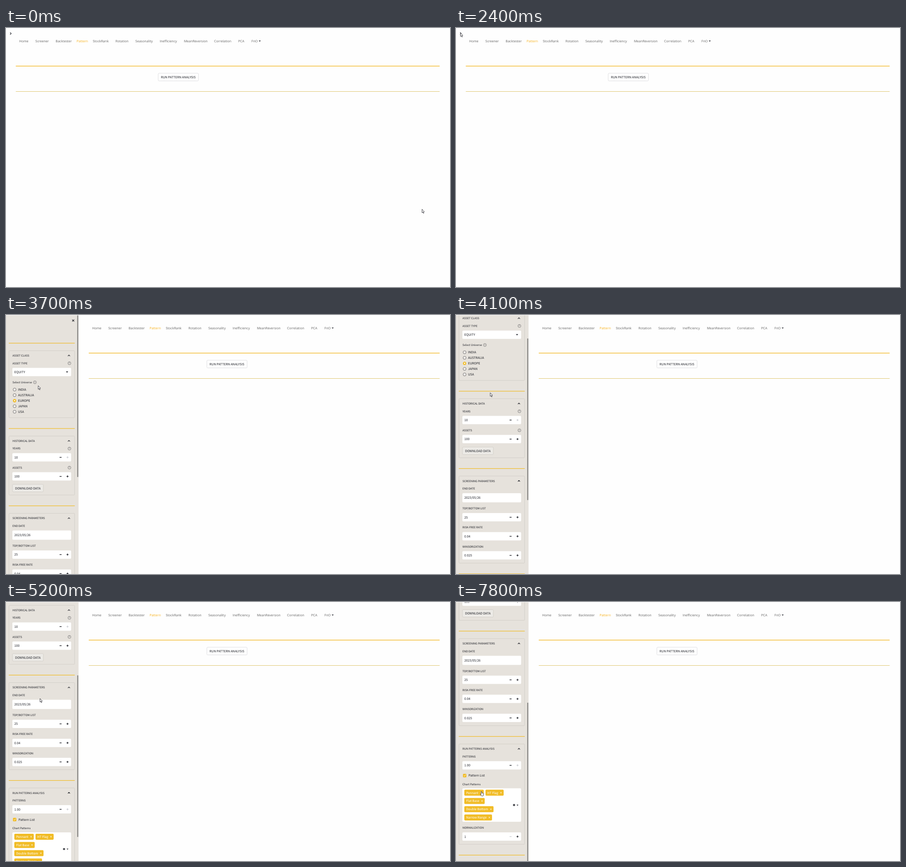
An HTML page with a canvas for the animation above (8 s loop, 960 by 561 pixels).

```html
<!DOCTYPE html>
<html lang="en">
<head>
<meta charset="utf-8">
<title>Pattern analysis dashboard</title>
<style>
html, body { margin: 0; width: 960px; height: 561px; overflow: hidden; background: #fefefe; }
canvas { display: block; width: 960px; height: 561px; }
</style>
</head>
<body>
<canvas id="stage"></canvas>
<script>
const W = 960, H = 561, LOOP = 8000, STEP = 100;
const canvas = document.getElementById('stage');
const ctx = canvas.getContext('2d');
const dpr = window.devicePixelRatio || 1;
canvas.width = W * dpr;
canvas.height = H * dpr;

const UI = '"Noto Sans CJK JP", "Noto Sans CJK SC", "Noto Sans CJK", "Open Sans", sans-serif';
const NAV = '"Open Sans", "Noto Sans", sans-serif';
const LABEL = 5.88, BODY = 6.73, MENU = 7.1;
const INK = '#1b1d24', GOLD = '#f1bc26', EDGE = '#cfcbc5', PANE = '#e6e2dc';
const OPEN_AT = 2800, SETTLE_AT = 3100, HAND_AT = 7000;
const ROW = 41.25, LEFT = 13.8, RIGHT = 140.8;

const menu = [
  ['Home', 28.5], ['Screener', 63.5], ['Backtester', 107.3], ['Pattern', 152.7],
  ['StockRank', 187.7], ['Rotation', 236.8], ['Seasonality', 279.8], ['Inefficiency', 332.2],
  ['MeanReversion', 384.7], ['Correlation', 450], ['PCA', 502], ['FnO', 530.8]
];

// Each move: start, duration, then the place it eases to.
const pointer = { from: [899.5, 392.5], moves: [
  [0, 400, 889, 379.5], [1200, 100, 647.5, 240.5], [1300, 800, 36, 20], [2100, 400, 8, 10],
  [2700, 200, 34.5, 30.5], [2900, 1200, 74, 168.5], [4100, 1100, 73.5, 209],
  [5200, 600, 73.5, 213.5], [6300, 800, 71, 464], [7100, 700, 55, 410.3]
] };
const scroll = { from: [0], moves: [
  [3700, 400, 80.8], [4100, 1100, 255], [5400, 400, 348], [5800, 300, 350.3]
] };
const slide = { from: [-157], moves: [[2700, 375, 0]] };

function place({ from, moves }, t) {
  let now = from;
  for (const [start, span, ...to] of moves) {
    const k = Math.min(1, Math.max(0, (t - start) / span));
    const e = 1 - (1 - k) ** 2;
    now = now.map((v, i) => v + (to[i] - v) * e);
  }
  return now;
}

function text(str, x, y, size = BODY, color = INK, family = UI) {
  ctx.font = `${size}px ${family}`;
  ctx.fillStyle = color;
  ctx.fillText(str, x, y + size * 0.365);
  return ctx.measureText(str).width;
}

function box(x, y, w, h, fill, stroke, r = 2) {
  ctx.beginPath();
  ctx.roundRect(x, y, w, h, r);
  if (fill) { ctx.fillStyle = fill; ctx.fill(); }
  if (stroke) { ctx.strokeStyle = stroke; ctx.lineWidth = 0.8; ctx.stroke(); }
}

function trace(points) {
  ctx.beginPath();
  points.forEach(([x, y], i) => i ? ctx.lineTo(x, y) : ctx.moveTo(x, y));
}

function path(points, color, width) {
  trace(points);
  ctx.strokeStyle = color;
  ctx.lineWidth = width;
  ctx.stroke();
}

function rule(x1, x2, y, h, color = GOLD) {
  ctx.fillStyle = color;
  ctx.fillRect(x1, y - h / 2, x2 - x1, h);
}

function cross(x, y, r, color, width) {
  path([[x - r, y - r], [x + r, y + r]], color, width);
  path([[x + r, y - r], [x - r, y + r]], color, width);
}

function caret(x, y, r) {
  trace([[x - r, y - r / 2], [x + r, y - r / 2], [x, y + r * 0.6]]);
  ctx.fillStyle = INK;
  ctx.fill();
}

function ring(x, y, r, color, width, fill) {
  ctx.beginPath();
  ctx.arc(x, y, r, 0, Math.PI * 2);
  if (fill) { ctx.fillStyle = fill; ctx.fill(); }
  ctx.strokeStyle = color;
  ctx.lineWidth = width;
  ctx.stroke();
}

function help(x, y) {
  ring(x, y, 3.2, '#5e5e60', 0.7);
  text('?', x - 1.3, y, 4.8, '#48484c');
}

// The sidebar flows downwards: y is the middle of the next label,
// edge is the right side of the fields.
let y, edge;

function panel(title, body) {
  rule(6, 148.7, y, 1.2);
  const top = y + 16.3;
  y = top + 10.6;
  text(title, 14, y, LABEL);
  path([[133.8, y + 1.2], [136.1, y - 1.2], [138.4, y + 1.2]], INK, 1.1);
  y += 16.6;
  body();
  const bottom = y - 5.5;
  box(6.4, top, 142, bottom - top, null, EDGE, 1.5);
  y = bottom + 23.4;
}

function field(name, value, hasHelp, height = 18) {
  text(name, 14, y, LABEL);
  if (hasHelp) help(edge - 3.7, y);
  const mid = y + 10 + height / 2;
  box(LEFT, mid - height / 2, edge - LEFT, height, '#fff');
  text(value, 18, mid);
  y += ROW + height - 18;
  return mid;
}

function stepper(name, value, off, hasHelp) {
  const mid = field(name, value, hasHelp);
  const tint = sign => sign === off ? '#c9cbd0' : INK;
  rule(edge - 25, edge - 20.6, mid, 1.3, tint('-'));
  rule(edge - 10, edge - 5.6, mid, 1.2, tint('+'));
  ctx.fillRect(edge - 8.4, mid - 2.2, 1.2, 4.4);
}

function assetPanel() {
  const mid = field('ASSET TYPE', 'EQUITY', true);
  caret(edge - 8.8, mid, 2.4);
  const w = text('Select Universe', 14, y, LABEL);
  help(14 + w + 6.3, y);
  ['INDIA', 'AUSTRALIA', 'EUROPE', 'JAPAN', 'USA'].forEach((name, i) => {
    const row = y + 15.8 + i * 12;
    if (name === 'EUROPE') ring(18.6, row, 2.5, GOLD, 2.2, '#fff');
    else ring(18.6, row, 3.3, '#5c5b5e', 0.8, '#eeebe7');
    text(name, 26, row);
  });
  y += 82.2;
}

function dataPanel() {
  stepper('YEARS', '10', '+', true);
  stepper('ASSETS', '100', '', true);
  box(14, y - 5, 66.8, 16.2, '#eceae6', EDGE);
  text('DOWNLOAD DATA', 19.8, y + 3.2);
  y += 23.6;
}

function screenPanel() {
  field('END DATE', '2023/05/26', false, 19.8);
  stepper('TOP/BOTTOM LIST', '25');
  stepper('RISK-FREE RATE', '0.04');
  stepper('WINSORIZATION', '0.025');
}

function tags(names, x0, mid) {
  let x = x0;
  for (const name of names) {
    ctx.font = `${BODY}px ${UI}`;
    const w = ctx.measureText(name).width + 15.6;
    if (x + w > 118) { x = x0; mid += 17.85; }
    box(x, mid - 6.5, w, 13, GOLD, null, 1.8);
    text(name, x + 4, mid, BODY, '#fff');
    cross(x + w - 5.7, mid, 1.4, '#fff', 0.9);
    x += w + 3.8;
  }
}

function patternPanel() {
  stepper('PATTERNS', '1.00', '+');
  box(15, y - 3.7, 7.4, 7.4, GOLD, null, 1.5);
  path([[16.8, y], [18.2, y + 1.5], [20.8, y - 1.7]], '#fff', 0.9);
  text('Pattern List', 27, y);
  y += 18.6;
  text('Chart Patterns', 14, y, LABEL);
  box(LEFT, y + 9, RIGHT - LEFT, 72.4, '#fff');
  tags(['Pennant', 'HT Flag', 'Flat Base', 'Double Bottom', 'Narrow Range'], 18, y + 18.5);
  ring(125.5, y + 45.2, 1.3, INK, 1.8, INK);
  cross(125.5, y + 45.2, 0.8, '#fff', 0.6);
  caret(133, y + 45.4, 2);
  y += 94.5;
  stepper('NORMALIZATION', '1', '-');
}

function sidebar(dx, s, settled) {
  edge = settled ? RIGHT : RIGHT - 23.8;
  ctx.save();
  ctx.translate(dx, 0);
  ctx.beginPath();
  ctx.rect(0, 0.7, 156.8, H);
  ctx.clip();
  ctx.fillStyle = PANE;
  ctx.fillRect(0, 0, 157, H);
  ctx.save();
  ctx.translate(0, -s);
  cross(145.3, 12, 2.2, INK, 1.1);
  y = 61;
  panel('ASSET CLASS', assetPanel);
  panel('HISTORICAL DATA', dataPanel);
  panel('SCREENING PARAMETERS', screenPanel);
  panel('RUN PATTERNS ANALYSIS', patternPanel);
  rule(6, 148.7, y, 1.2);
  ctx.restore();
  box(153.9, 0.7 + s * 0.62, 2.5, 350.3, '#8b8a88', null, 1);
  ctx.restore();
}

function mainArea(open) {
  const dx = open ? 157.7 : 0;
  for (const [name, x] of menu) {
    text(name, x + dx, 28.1, MENU, name === 'Pattern' ? '#f7b11b' : '#636363', NAV);
  }
  caret(548.7 + dx, 28.3, 2.2);
  rule(21.2 + dx, 937.6, 82.5, 1.4, '#f3bb2b');
  rule(21.2 + dx, 937.6, 137.5, 0.8, '#d8bb50');
  const bx = open ? 434.3 : 329.1;
  box(bx, 98, 87, 16.6, '#fff', '#d7d7db');
  text('RUN PATTERN ANALYSIS', bx + 5.8, 106.4);
  if (!open) path([[8.9, 9.6], [11.3, 11.9], [8.9, 14.2]], INK, 1.2);
}

function cursor(px, py, hand) {
  const arrow = [[0, 0], [0, 7.6], [1.7, 6.1], [3, 9], [4.1, 8.5], [2.9, 5.8], [5.1, 5.5]];
  const finger = [[-0.8, 0.6], [0, 0], [0.9, 0.6], [1, 3.2], [4.2, 4.2], [4.8, 5], [4.4, 8],
    [3.6, 9.8], [0.2, 9.8], [-1.9, 6.8], [-1.9, 5.6], [-0.7, 6]];
  ctx.save();
  ctx.translate(px, py);
  trace(hand ? finger : arrow);
  ctx.closePath();
  ctx.fillStyle = '#fff';
  ctx.fill();
  ctx.strokeStyle = '#25252b';
  ctx.lineWidth = 0.8;
  ctx.stroke();
  ctx.restore();
}

function draw(t) {
  ctx.setTransform(dpr, 0, 0, dpr, 0, 0);
  ctx.lineJoin = 'round';
  if ('textRendering' in ctx) ctx.textRendering = 'geometricPrecision';
  ctx.fillStyle = '#fefefe';
  ctx.fillRect(0, 0, W, H);
  const open = t >= OPEN_AT;
  mainArea(open);
  if (open) sidebar(place(slide, t)[0], place(scroll, t)[0], t >= SETTLE_AT);
  cursor(...place(pointer, t), t >= HAND_AT);
}

const start = performance.now();
function tick() {
  const t = (performance.now() - start) % LOOP;
  draw(Math.floor(t / STEP) * STEP);
  requestAnimationFrame(tick);
}
tick();
</script>
</body>
</html>
```
